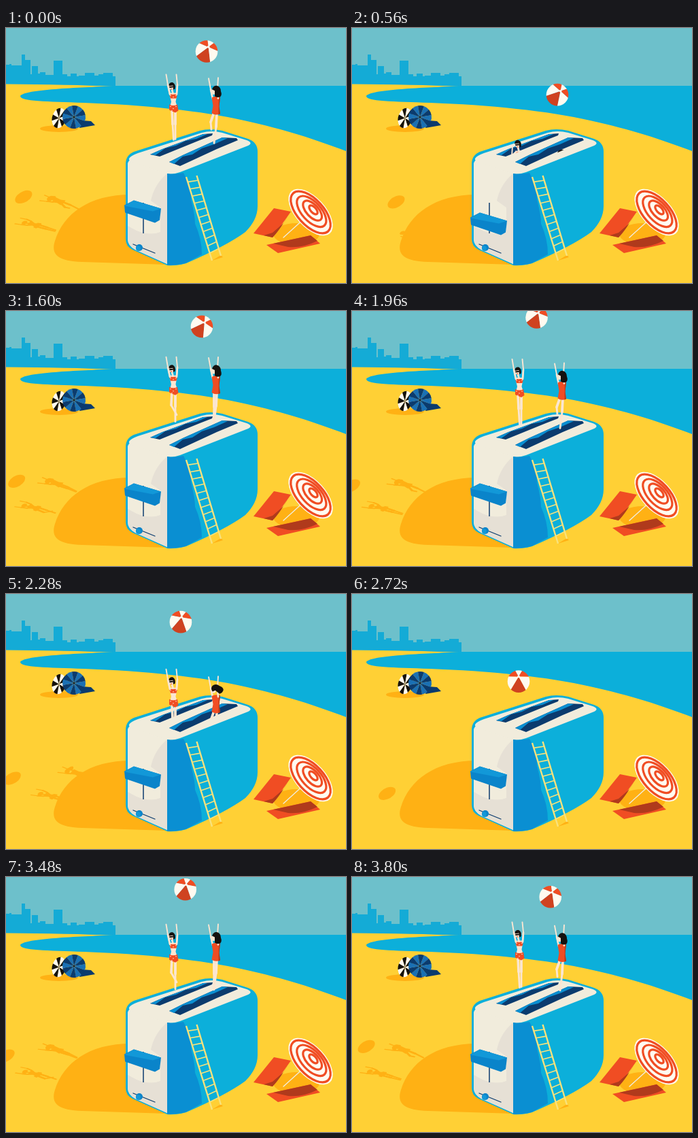
Recreate the animation shown at these times as an HTML page with a canvas. Size 500 by 375 pixels, loop 3.84 s.

```html
<!DOCTYPE html>
<html lang="en">
<head>
<meta charset="utf-8">
<title>Toaster beach</title>
<style>
html, body { margin: 0; width: 500px; height: 375px; overflow: hidden; background: #ffd035; }
canvas { display: block; width: 500px; height: 375px; }
</style>
</head>
<body>
<canvas id="stage" width="500" height="375"></canvas>
<script>
const ctx = document.getElementById('stage').getContext('2d');
const LOOP = 3840, JUMP = LOOP / 2;
const C = {
  sky: '#6dc0cb', city: '#14abd6', sea: '#0cafda', sand: '#ffd035', shade: '#ffb114',
  cream: '#f1ecdc', grey: '#e6e0d5', blue: '#0a8fd2', navy: '#0b3b6e', red: '#f04d23',
  dark: '#b03a1c', skin: '#fbe6d2', black: '#15120f', wood: '#f8e27c', white: '#fffaf0'
};

const clamp = v => Math.max(0, Math.min(1, v));
const lerp = (a, b, k) => a + (b - a) * k;
const smooth = (a, b, t) => { const k = clamp((t - a) / (b - a)); return k * k * (3 - 2 * k); };

function fill(path, color) {
  ctx.fillStyle = color;
  ctx.fill(new Path2D(path));
}
function line(points, color, width, cap = 'round') {
  ctx.strokeStyle = color;
  ctx.lineWidth = width;
  ctx.lineCap = cap;
  ctx.lineJoin = 'round';
  ctx.beginPath();
  points.forEach(([x, y]) => ctx.lineTo(x, y));
  ctx.stroke();
}
function oval(x, y, rx, ry, color, turn = 0) {
  ctx.fillStyle = color;
  ctx.beginPath();
  ctx.ellipse(x, y, rx, ry, turn, 0, 7);
  ctx.fill();
}
function wedges(x, y, r, count, colors, turn) {
  for (let i = 0; i < count; i++) {
    const a = turn + i * 2 * Math.PI / count;
    ctx.fillStyle = colors[i % colors.length];
    ctx.beginPath();
    ctx.moveTo(x, y);
    ctx.arc(x, y, r, a, a + 2 * Math.PI / count + 0.01);
    ctx.fill();
  }
}

function drawBackdrop() {
  ctx.fillStyle = C.sand;
  ctx.fillRect(0, 0, 500, 375);
  ctx.fillStyle = C.sky;
  ctx.fillRect(0, 0, 500, 85);
  fill('M0 84V54H5V53H8V55H23V39H28V47H36V68H38V56H47V67H50V65H58V69H70V48H83V68H90V71H95V67H104V71H107V70H116V66H130V70H136V68H143V66H157V71H161V86Z', C.city);
  fill('M0 82.5Q90 83 160 86V100H0Z', C.sand);
  fill('M500 85H160C105 88 28 90 21 100C21 108 60 108 115 110C200 113 290 122 350 136C410 149 455 164 500 181Z', C.sea);
}

function drawSmallUmbrellas() {
  oval(78, 148, 28, 5, C.shade);
  fill('M112 136L125 137L131 143L108 147Z', C.navy);
  ctx.save();
  ctx.translate(78, 132.5);
  ctx.rotate(0.25);
  ctx.scale(0.68, 1);
  wedges(0, 0, 15, 10, [C.black, C.white], 0.2);
  ctx.restore();
  wedges(100, 131, 17, 12, [C.navy, '#1a70b4'], 0.35);
  oval(100, 131, 1.2, 1.2, C.black);
}

function drawParasol() {
  oval(427, 303, 34, 16, C.shade);
  fill('M364 302L394 265L419 270L392 308Z', C.red);
  fill('M383 319L448 305L462 317L400 331Z', C.red);
  fill('M392 301L408 287L416 274Q402 298 392 308L379 305Z', C.dark);
  fill('M393 317L448 305L458 313Q436 324 415 322Z', C.dark);
  line([[450, 270], [408, 308]], C.cream, 1.4);
  ctx.save();
  ctx.translate(448, 271);
  ctx.rotate(0.83);
  oval(0, 0, 42, 22, C.white);
  for (let i = 0; i < 4; i++) {
    ctx.strokeStyle = C.red;
    ctx.lineWidth = 3.2;
    ctx.beginPath();
    ctx.ellipse(0, -i * 1.8, 38 - i * 10, 19 - i * 5, 0, 0, 7);
    ctx.stroke();
  }
  ctx.restore();
}

function drawToaster() {
  fill('M176 200Q176 187 188 182L285 151Q300 147 318 151L356 163Q370 168 370 182V262Q370 282 352 300Q325 320 265 346Q250 350 237 349L186 326Q176 321 176 310Z', C.sea);
  fill('M179 199Q181 191 192 195L237 213V347L190 326Q179 320 179 311Z', C.cream);
  fill('M237 214Q218 230 213 254L227 264V300Q212 306 192 298L179 291V311Q180 320 190 326L237 347Z', C.grey);
  fill('M181 192Q183 188 194 184L288 154Q302 150 318 154L354 165Q364 169 356 173L256 212Q242 217 232 213L188 198Q180 196 181 192Z', C.cream);
  fill('M237 214Q246 216 261 213Q273 235 272 252Q278 275 278 288Q288 310 288 333L264 346Q252 349 237 349Z', C.blue);

  fill('M212 186L230 178L290 156L304 155L303 158L285 165L226 189Z', C.navy);
  fill('M212 186L230 178L290 156L296 156L280 163L264 166L250 173L234 177L220 187Z', C.blue);
  fill('M240 197L260 187L318 161L339 162L341 165L310 178L256 203Z', C.navy);
  fill('M240 197L260 187L318 161L326 162L306 171L288 177L274 186L260 189L247 200Z', C.blue);
}

function drawLever(p) {
  const y = 1.5 + 18 * (smooth(380, 520, p) - smooth(640, 720, p));
  line([[202, 257], [202, 302]], C.navy, 1.5, 'butt');
  ctx.save();
  ctx.translate(0, y);
  fill('M174 259L188 252L228 264L226 281L219 285L175 270Z', '#0a84ca');
  fill('M174 260L188 252L228 264L216 268Z', '#1298d8');
  ctx.restore();
  line([[187, 318], [219, 331]], C.navy, 1.3);
  oval(196, 323, 5, 5, '#0a84ca');
  oval(194.5, 324, 3.4, 3.8, '#1298d8');
}

function drawLadder() {
  const left = k => [lerp(265, 303, k), lerp(219, 342, k)];
  const right = k => [lerp(280.5, 316, k), lerp(217, 335, k)];
  fill('M303 342L316 334L319 337Z', C.shade);
  for (let i = 0; i < 11; i++) {
    const k = 0.06 + i * 0.085;
    line([left(k), right(k)], C.wood, 1.6, 'butt');
  }
  [left, right].forEach(side => line([side(0), side(1)], C.wood, 2.4, 'butt'));
}

function ballAt(t) {
  if (t < 410) return [295 + t * 0.0125, 15.5 + 0.00028 * (t + 260) ** 2];
  if (t < 1110) {
    const x = t < 560 ? 295 + t * 0.0125 : lerp(302, 300, (t - 560) / 550);
    return [x, 74 + 0.00043 * (t - 798) ** 2];
  }
  if (t < 1400) {
    const k = clamp((t - 1160) / 240);
    return [300 - 3 * k, lerp(115.5, 53, k * k * (2 - k))];
  }
  if (t < 2680) return [Math.max(245, 288 - 0.0456 * (t - 1600)), 8 + 0.0002 * (t - 1874) ** 2];
  if (t < 3100) return [245, 102.6 + 0.00043 * (t - 2967) ** 2];
  if (t < 3300) return [245, lerp(110, 37.5, clamp((t - 3160) / 140) ** 1.5)];
  return [lerp(245, 295, ((t - 3300) / 540) ** 0.9), 15.5 + 0.00028 * (t - 3580) ** 2];
}

function drawBall(x, y, t) {
  ctx.save();
  ctx.beginPath();
  ctx.arc(x, y, 16.3, 0, 7);
  ctx.clip();
  ctx.translate(x, y);
  ctx.rotate(0.25 + Math.sin(t / LOOP * 2 * Math.PI) * 0.4);
  wedges(1, -7, 40, 6, ['#cf4220', C.white, C.red, C.white, C.red, C.white], 1.2);
  oval(1, -7, 2, 1.6, C.white);
  ctx.restore();
}

// How far a jumper has sunk below the top of the leap.
function sinkAt(p, peak) {
  const since = p < 790 ? p + JUMP - peak : p - peak;
  return Math.min(125, since * since * (since < 0 ? 0.000145 : 0.000172));
}

function mix(a, b, k) {
  return a.map((point, i) => point.map((v, j) => lerp(v, b[i][j], k)));
}

function limb(joints, width, color) {
  line(joints, color, width);
  line(joints.slice(0, 2), color, width + 0.8);
}

function drawFrontWoman(pose, ink) {
  const c = name => ink || C[name];
  const { bent, kick, holding } = pose;
  const lowL = holding ? [[241, 91], [233, 97], [235, 90]] : [[241, 91], [235, 97], [236, 82]];
  const lowR = holding ? [[251, 91], [259, 97], [257, 89]] : [[251, 91], [258, 99], [256, 87]];
  limb([[249, 113], [249, 135], [249, 157]], 2.8, c('skin'));
  limb(mix([[244, 113], [245, 135], [246.5, 158]], [[244, 113], [243, 133], [251, 147]], kick), 2.8, c('skin'));
  fill('M240 89L252 89L249.5 102L252 110L241 110L243 102Z', c('skin'));
  fill('M240 106Q246 109 252 106L253.5 115L249 118L240 114Z', c('red'));
  fill('M240 91L252 91L250.5 97L242 97Z', c('red'));
  line([[245.5, 90], [244, 84]], c('skin'), 2.8);
  oval(243.5, 80, 3.6, 4.8, c('skin'));
  fill('M239 79Q239.5 73 245 73.5Q250 76 248.5 83L246 84L245.5 78Z', c('black'));
  if (!ink) {
    line([[241, 80.5], [245, 80]], C.black, 2);
    line([[242, 83.5], [244, 83.5]], C.red, 1);
    [[242, 93], [246, 95], [250, 93], [242, 109], [246, 112], [250, 109], [244, 115]]
      .forEach(([x, y]) => oval(x, y, 0.7, 0.7, C.white));
  }
  limb(mix([[241, 91], [238, 77], [235.5, 62]], lowL, bent), 1.9, c('skin'));
  limb(mix([[251, 91], [252, 77], [250.5, 62]], lowR, bent), 1.9, c('skin'));
}

function drawBackWoman(pose, ink) {
  const c = name => ink || C[name];
  const { bent, kick, holding, trail } = pose;
  const lowL = holding ? [[304, 96], [297, 96], [294, 85]] : [[304, 96], [294, 97], [286, 83]];
  const lowR = holding ? [[312, 95], [304, 95], [302, 88]] : [[312, 95], [304, 94], [303, 80]];
  limb(mix([[304, 96], [301, 82], [298, 66]], lowL, bent), 1.9, c('skin'));
  limb([[310, 116], [309, 137], [306, 161]], 2.9, c('skin'));
  limb(mix([[306, 116], [306, 138], [305, 161]], [[306, 116], [301, 130], [302, 141]], kick), 2.9, c('skin'));
  fill('M302.5 94Q308 91 315 93L313.5 107L315 118Q308 121 302.5 117L304.5 106Z', c('red'));
  if (!ink) fill('M313 93L315 93L313.5 107L315 118L312.5 119Z', C.dark);
  limb(mix([[312, 95], [311, 81], [312, 65]], lowR, bent), 1.9, c('skin'));
  oval(305.5, 85, 3.2, 4.6, c('skin'));
  ctx.save();
  ctx.translate(309, 84);
  ctx.rotate(-0.9 * trail);
  fill('M-6 -2Q-4 -8 1 -7.5Q7 -6 7 1Q9 6 6 9Q1 11 -2 8L-2 0Z', c('black'));
  ctx.restore();
}

// Hides whatever has dropped past the near edge of a slot.
function inSlot(x1, y1, x2, y2, draw, sink) {
  const slope = (y2 - y1) / (x2 - x1);
  ctx.save();
  ctx.beginPath();
  ctx.moveTo(150, 0);
  ctx.lineTo(400, 0);
  ctx.lineTo(400, y1 + slope * (400 - x1));
  ctx.lineTo(150, y1 + slope * (150 - x1));
  ctx.clip();
  ctx.translate(0, sink);
  draw();
  ctx.restore();
}

function render(t) {
  const p = t % JUMP;
  const firstHalf = t < JUMP;
  const bent = smooth(390, 520, p) - smooth(1200, 1400, p);
  const switchLeg = p < 800 ? 1 : smooth(1640, 1820, p);
  const front = { bent, kick: 1 - switchLeg, holding: !firstHalf };
  const back = {
    bent, kick: switchLeg, holding: firstHalf,
    trail: smooth(120, 360, p) - smooth(800, 1000, p)
  };
  const [bx, by] = ballAt(t);
  const frontWoman = ink =>
    inSlot(226, 190, 303, 159, () => drawFrontWoman(front, ink), 2 + sinkAt(p, 1760));
  const backWoman = ink =>
    inSlot(256, 204, 341, 166, () => drawBackWoman(back, ink), 1 + sinkAt(p, 1715));

  drawBackdrop();
  drawSmallUmbrellas();
  fill('M190 245C124 243 85 272 72 313C65 334 78 343 112 344L237 348Z', C.shade);

  ctx.save();
  ctx.transform(0.531, -0.5616, 0.556, 0.178, -150, 408);
  frontWoman(C.shade);
  backWoman(C.shade);
  oval(bx, by, 16.3, 16.3, C.shade);
  ctx.restore();

  drawParasol();
  drawToaster();
  drawLever(p);
  drawLadder();
  frontWoman();
  drawBall(bx, by, t);
  backWoman();
}

function tick() {
  render(performance.now() % LOOP);
  requestAnimationFrame(tick);
}
tick();
</script>
</body>
</html>
```
